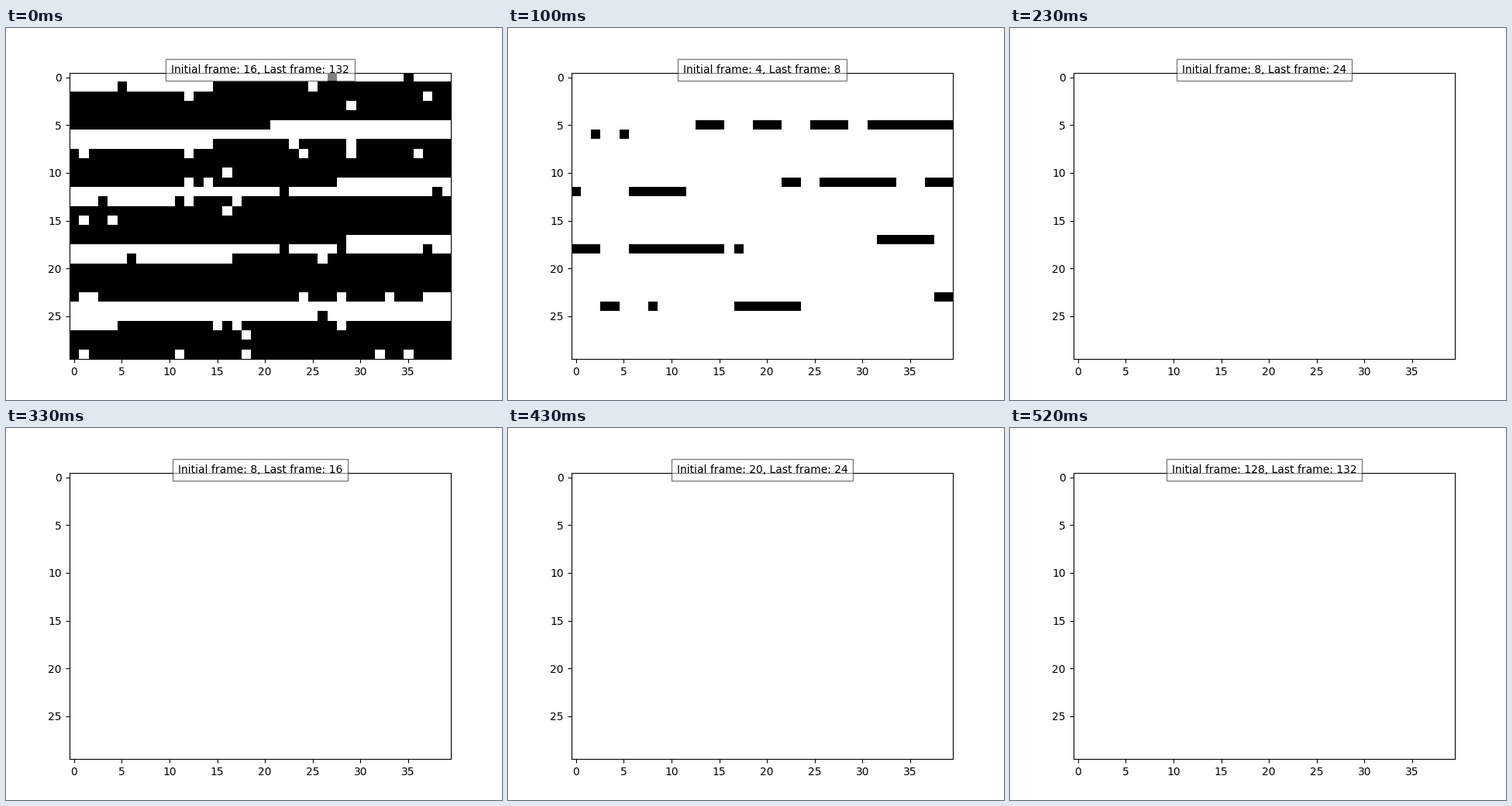
Write a matplotlib script that moves like this. It is 640x480 px and loops after 0.56 s.

```python
import numpy as np
import matplotlib.pyplot as plt
from matplotlib.animation import FuncAnimation

ROWS, COLS = 30, 40
STEP = 10  # ms


def grid(starts=(), ends=(), chance=0, widest=1, reach=40, specks=0, seed=1):
    """Dark bands running on from row to row, frayed by random gaps near their ends."""
    rng = np.random.default_rng(seed)
    flat = np.ones(ROWS * COLS)
    for start, end in zip(starts, ends):
        flat[start:end] = 0
        for i in range(start + 1, end - 1):
            depth = min(i - start, end - i)
            if rng.random() < chance * np.exp(-depth / reach):
                flat[i:min(i + rng.integers(1, widest + 1), end - 1)] = 1
        # stray dark cells in the row's length ahead of the band
        lead = flat[max(start - COLS, 0):start]
        lead[rng.random(lead.size) < specks] = 0
    return flat.reshape(ROWS, COLS)


dense = grid(starts=(55, 296, 531, 777, 1045), ends=(221, 468, 709, 957, 1200),
             chance=0.14, specks=0.04)
sparse = grid(starts=(213, 462, 712, 958), ends=(246, 492, 738, 984),
              chance=0.22, widest=3)
medium = grid(starts=(0, 247, 492, 738, 988), ends=(51, 303, 548, 797, 1043),
              chance=0.12, widest=2)
blank = grid()

# (duration in ms, cells, first, last)
scenes = [(100, dense, 16, 132), (100, sparse, 4, 8), (30, medium, 4, 16),
          (100, blank, 8, 24), (100, blank, 8, 16), (30, blank, 20, 24),
          (100, blank, 128, 132)]
ends = np.cumsum([s[0] for s in scenes])

fig, ax = plt.subplots(figsize=(6.4, 4.8), dpi=100)
image = ax.imshow(blank, cmap="gray", vmin=0, vmax=1, interpolation="nearest")
label = ax.text(0.5, 1.0, "", transform=ax.transAxes, ha="center",
                bbox=dict(facecolor="w", alpha=0.5, pad=5))


def update(i):
    _, cells, first, last = scenes[np.searchsorted(ends, i * STEP, side="right")]
    image.set_data(cells)
    label.set_text(f"Initial frame: {first}, Last frame: {last}")
    return image, label


anim = FuncAnimation(fig, update, frames=int(ends[-1]) // STEP, interval=STEP,
                     repeat=True, repeat_delay=0)
plt.show()
```
